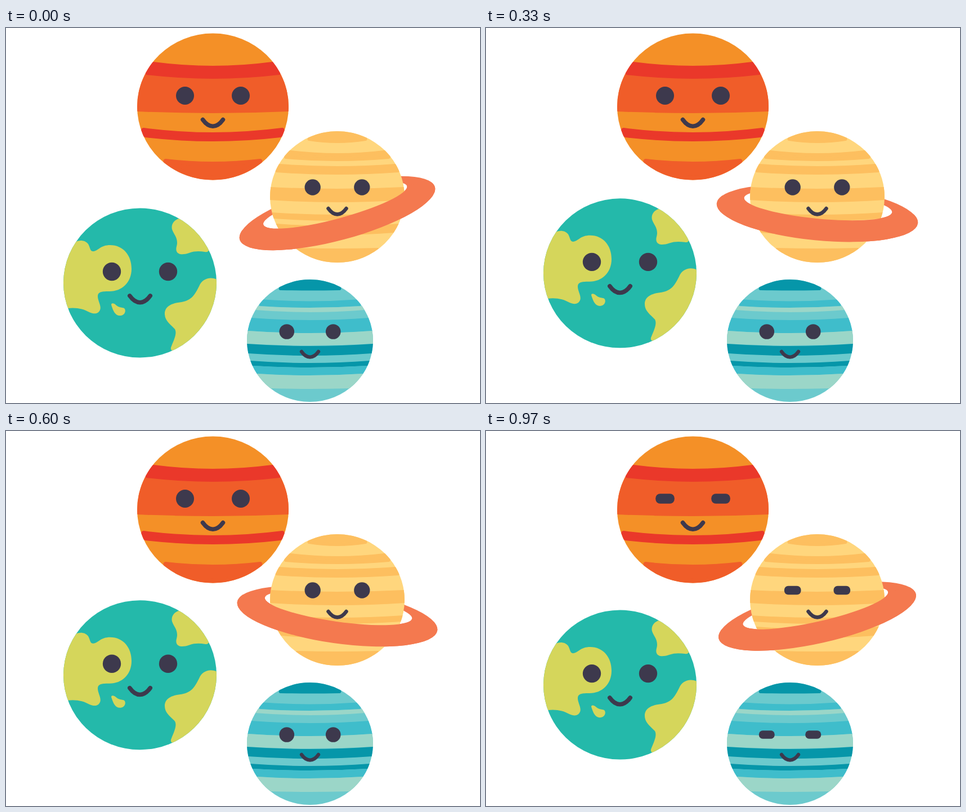
Recreate the animation shown at these times as an HTML page. Size 842 by 665 pixels, loop 1000 ms.

```html
<!DOCTYPE html>
<html lang="en">
<head>
<meta charset="utf-8">
<title>Smiling planets</title>
<style>
  html, body { margin: 0; width: 100%; height: 100%; overflow: hidden; background: #fff; }
  svg { display: block; width: 100%; height: 100%; }
</style>
</head>
<body>
<svg id="stage" viewBox="0 0 842 665"></svg>
<script>
const NS = "http://www.w3.org/2000/svg";
const INK = "#3d394d";
const stage = document.getElementById("stage");

function add(parent, tag, attrs) {
  const el = document.createElementNS(NS, tag);
  set(el, attrs);
  parent.appendChild(el);
  return el;
}

function set(el, attrs) {
  for (const key in attrs) el.setAttribute(key, attrs[key]);
}

function planet(cx, cy, rx, ry, fill) {
  const g = add(stage, "g", {});
  add(g, "ellipse", { cx, cy, rx, ry, fill });
  return { g, cx, cy, rx, ry };
}

// Stripe from rim to rim; the sags bow its edges down, r rounds its corners.
function band(p, top, topSag, bottom, bottomSag, fill, r = 0) {
  const rx = p.rx - r, ry = p.ry - r;
  const y0 = Math.max(top + r, p.cy - ry);
  const y1 = Math.min(bottom - r, p.cy + ry);
  const half = y => rx * Math.sqrt(Math.max(0, 1 - ((y - p.cy) / ry) ** 2));
  const h0 = half(y0), h1 = half(y1);
  const d = `M${p.cx - h0} ${y0} Q${p.cx} ${y0 + 2 * topSag} ${p.cx + h0} ${y0}` +
    `A${rx} ${ry} 0 0 1 ${p.cx + h1} ${y1}` +
    `Q${p.cx} ${y1 + 2 * bottomSag} ${p.cx - h1} ${y1}` +
    `A${rx} ${ry} 0 0 1 ${p.cx - h0} ${y0}Z`;
  const style = r ? { stroke: fill, "stroke-width": 2 * r, "stroke-linejoin": "round" } : {};
  add(p.g, "path", { d, fill, ...style });
}

// Returns a function that sets how far the eyes are shut: 0, 1 or 2.
function face(p, eyeY, scale) {
  const g = add(p.g, "g", { transform: `translate(${p.cx} ${eyeY}) scale(${scale})` });
  const eyes = [-49.5, 49.5].map(x => ({ x, el: add(g, "rect", { fill: INK }) }));
  add(g, "path", {
    d: "M-18 42.5C-7 58 7 58 18 42.5",
    fill: "none", stroke: INK, "stroke-width": 7.5, "stroke-linecap": "round"
  });
  const sizes = [[32, 32, 16], [33.5, 17.5, 8], [43.5, 8, 4]];
  return level => {
    const [width, height, rx] = sizes[level];
    for (const { x, el } of eyes) set(el, { x: x - width / 2, y: -height / 2, width, height, rx });
  };
}

// Striped orange planet
const jove = planet(367.5, 139.5, 134.5, 130, "#f49027");
band(jove, 82, 7, 148, 3, "#f05d29");
band(jove, 60, 7, 83, 7, "#ea382a", 2);
band(jove, 177, 8, 194, 7, "#ea382a", 4);
band(jove, 232, 5, 270, 0, "#f05d29", 4);
const joveEyes = face(jove, 120, 1);

// Ringed planet: whole ring behind, front half above
const RING = "#f4794f";
const ringBack = add(stage, "path", {
  fill: RING, "fill-rule": "evenodd",
  d: "M-179.5 0A179.5 48 0 0 1 179.5 0A179.5 48 0 0 1 -179.5 0Z" +
     "M-132 -14.5A132 24 0 0 1 132 -14.5A132 24 0 0 1 -132 -14.5Z"
});
const ringed = planet(588.5, 299.5, 119.5, 116.5, "#ffd67d");
const SAND = "#fdbf5f";
band(ringed, 183, 0, 200, 4, SAND, 3);
band(ringed, 217, 5, 232, 4, SAND, 3);
band(ringed, 241, 4, 256, 4, SAND, 2);
band(ringed, 282, 3, 305, 4, SAND);
band(ringed, 327, 4, 338, 4, SAND);
band(ringed, 347, 4, 363, 4, SAND);
band(ringed, 390, 1, 416, 0, SAND, 1);
const ringedEyes = face(ringed, 282.5, 0.885);
const ringFront = add(stage, "path", {
  fill: RING,
  d: "M-132 -14.5A132 24 0 0 0 132 -14.5L171.1 -14.5" +
     "A179.5 48 0 0 1 179.5 0A179.5 48 0 0 1 -179.5 0A179.5 48 0 0 1 -171.1 -14.5Z"
});

// Striped blue planet
const blue = planet(540, 554.5, 112, 108.5, "#6ccacd");
const DEEP = "#0696a9", CYAN = "#3fbdcb", PALE = "#9bd6c8";
band(blue, 446, 0, 465, 0.5, DEEP, 3);
band(blue, 481.5, 3, 493, 3, CYAN, 2);
band(blue, 493, 3, 500, 4, PALE);
band(blue, 514, 4, 537, 4, CYAN);
band(blue, 537, 4, 560, 3, PALE);
band(blue, 560, 4, 577, 4, DEEP);
band(blue, 590, 4, 599, 3, DEEP);
band(blue, 599, 3, 613, 3, CYAN);
band(blue, 613, 3, 639, 1, PALE);
const blueEyes = face(blue, 538.5, 0.833);

// Green and teal planet
const earth = planet(238, 452, 136, 132.5, "#24b9aa");
const clip = add(add(stage, "defs", {}), "clipPath", { id: "globe" });
add(clip, "ellipse", { cx: 238, cy: 452, rx: 136, ry: 132.5 });
add(earth.g, "path", {
  fill: "#d5d65b", "clip-path": "url(#globe)",
  d: "M90 380L122 380C130 375 141 376 146 383C150 390 149 397 156 396C165 394 168 385 185 385" +
     "C208 385 223 403 223 427C223 451 206 467 184 467C172 467 163 467 163 476" +
     "C163 484 170 493 167 500C164 507 157 508 148 504C138 498 125 495 109 497L90 497Z" +
     "M187 491C187 487 192 488 195 491C200 496 205 495 210 497C214 501 211 509 204 510C195 511 191 504 187 491Z" +
     "M308 338C298 340 293 349 295 357C298 366 304 370 304 381C304 387 301 390 303 396" +
     "C306 403 316 402 325 399C336 395 345 396 353 397C358 398 360 396 361 392L390 392L340 330Z" +
     "M375 446C362 440 348 445 343 458C336 472 330 483 312 486C293 488 282 494 282 507" +
     "C282 520 294 527 300 534C304 541 299 552 294 564C291 570 294 573 299 572L330 580L390 500Z"
});
const earthEyes = face(earth, 432, 1.01);

// Start time in ms of each held pose
const STARTS = [0, 70, 100, 130, 170, 210, 250, 290, 330, 370, 410, 450, 490, 530,
  570, 600, 640, 690, 730, 770, 820, 870, 900, 930, 970];
const LOOP = 1000;

const blink = (pose, shut) => Math.max(0, 2 - Math.abs(pose - shut));

function draw(ms) {
  const t = ms % LOOP;
  const pose = STARTS.filter(s => s <= t).length - 1;
  const swing = Math.min(1, pose / 11.65, (25 - pose) / 13);

  earth.g.setAttribute("transform", `translate(0 ${-25 * swing})`);
  const tilt = `translate(588.5 328.5) rotate(${-15 + 30 * swing})`;
  ringBack.setAttribute("transform", tilt);
  ringFront.setAttribute("transform", tilt);

  earthEyes(blink(pose, 13));
  for (const eyes of [joveEyes, ringedEyes, blueEyes]) eyes(blink(pose, 23));
}

const begin = performance.now();
function tick() {
  draw(performance.now() - begin);
  requestAnimationFrame(tick);
}
draw(0);
requestAnimationFrame(tick);
</script>
</body>
</html>
```
